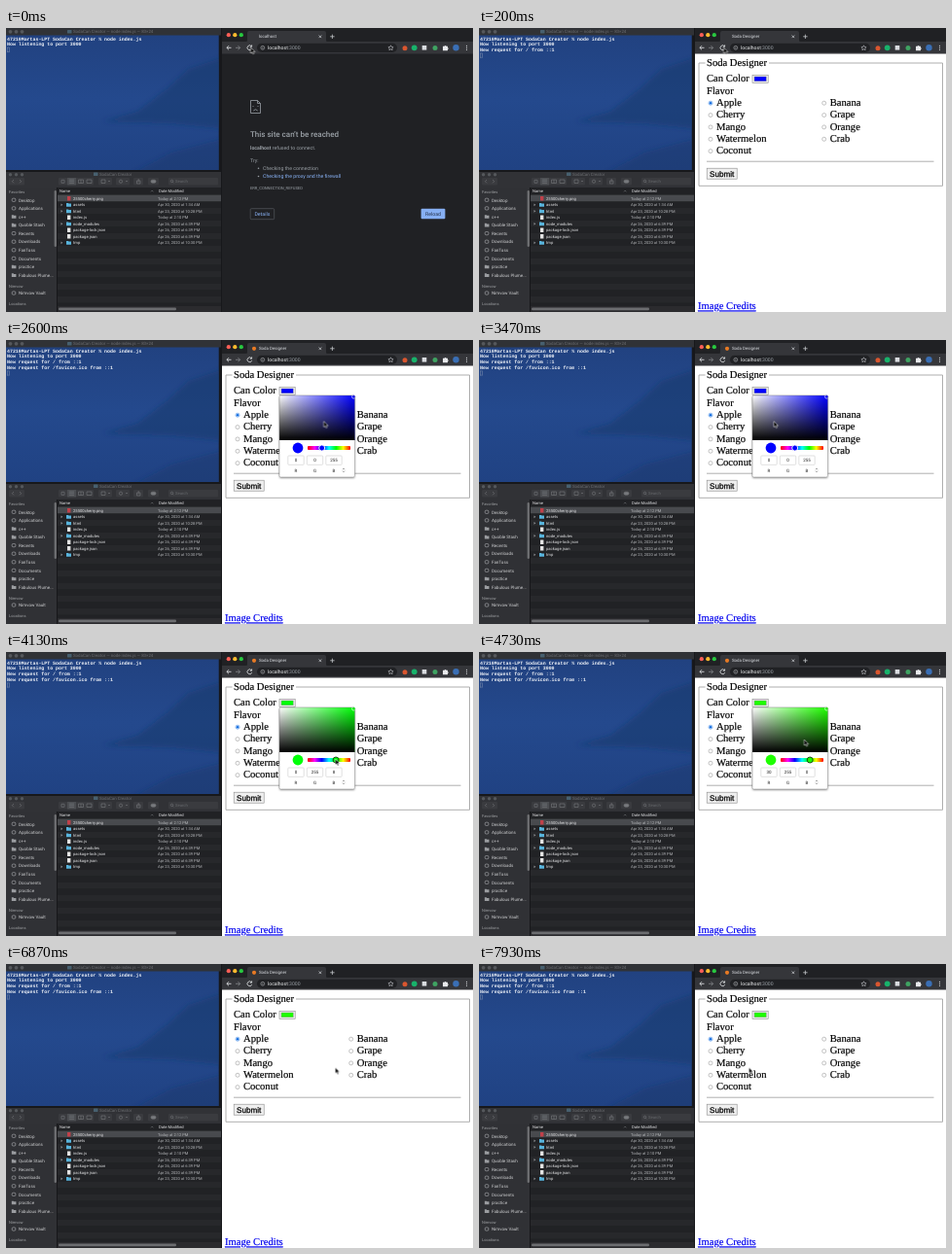
Recreate the animation shown at these times as an HTML page. Size 480 by 292 pixels, loop 8 s.

```html
<!DOCTYPE html>
<html lang="en">
<head>
<meta charset="utf-8">
<title>Soda Designer</title>
<style>
html, body { margin: 0; width: 100%; height: 100%; overflow: hidden; background: #000; }
svg { display: block; width: 100vw; height: 100vh; --hue: 240; }
text { font-family: Roboto, "Open Sans", sans-serif; text-rendering: geometricPrecision; white-space: pre; }
.mono text { font: bold 4.93px "Liberation Mono", monospace; fill: #f2f5fa; }
.serif text { font: 10.6px "Liberation Serif", serif; fill: #000; stroke: #000; stroke-width: .18; }
.serif .button { font: 8.1px "Liberation Sans", sans-serif; stroke-width: .25; }
.serif .credits { fill: #00e; stroke: #00e; text-decoration: underline; }
.hue { fill: hsl(var(--hue) 100% 50%); }
.side text { font-size: 4.5px; fill: #d0d1d3; }
.side .head { font-size: 4px; fill: #a0a2a5; }
.list text { font-size: 4.15px; fill: #e0e1e3; }
.list .date { font-size: 4.05px; fill: #b4b6b9; }
.err text { font-size: 5.2px; fill: #9aa0a6; }
.err .title { font-size: 8px; font-weight: 500; }
.err .code { font-size: 4.1px; }
.err .link { fill: #8ab4f8; }
.err .dark { fill: #26344f; }
.err .tab, .tab { font-size: 4.4px; fill: #dee1e6; }
.mid { text-anchor: middle; }

.err, .page, .req1, .req2, .icon, .picker { animation: 8s step-end infinite; }
.err { animation-name: err; }
.page { animation-name: page; }
.req1 { animation-name: req1; }
.req2 { animation-name: req2; }
.icon { animation-name: icon; }
.picker { animation-name: picker; }
.block { animation: block 8s step-end infinite; }
.cursor { animation: move 8s linear infinite; }

@keyframes err { 0% { visibility: visible } 2.5%, 100% { visibility: hidden } }
@keyframes page { 0% { visibility: hidden } 2.5%, 100% { visibility: visible } }
@keyframes req1 { 0% { visibility: hidden } 1.6%, 100% { visibility: visible } }
@keyframes req2 { 0% { visibility: hidden } 4.1%, 100% { visibility: visible } }
@keyframes icon { 0% { visibility: hidden } 13.3%, 100% { visibility: visible } }
@keyframes picker { 0% { visibility: hidden } 26.6% { visibility: visible } 67.5%, 100% { visibility: hidden } }
@keyframes block {
  0% { transform: none }
  1.6% { transform: translateY(5.8px) }
  4.1%, 100% { transform: translateY(11.6px) }
}
@keyframes move {
  0%, 2.5% { transform: translate(251.5px, 20px) }
  6% { transform: translate(246px, 50px) }
  10%, 13.3% { transform: translate(238.5px, 82px) }
  16.6% { transform: translate(285.5px, 54.5px) }
  22.5%, 29.2% { transform: translate(288px, 51px) }
  32.5% { transform: translate(326.5px, 83.5px) }
  36% { transform: translate(359px, 88px) }
  40% { transform: translate(354px, 67px) }
  43.2% { transform: translate(301px, 82px) }
  46.6%, 51.6% { transform: translate(338.5px, 110px) }
  55.9%, 57.5% { transform: translate(340px, 110px) }
  59.1% { transform: translate(333.5px, 90px) }
  62% { transform: translate(395px, 98px) }
  65%, 69.2% { transform: translate(426px, 36px) }
  72.5% { transform: translate(361.5px, 106px) }
  76% { transform: translate(347px, 121px) }
  80% { transform: translate(336px, 115px) }
  84% { transform: translate(330px, 123px) }
  88% { transform: translate(348px, 88px) }
  90.9% { transform: translate(354px, 100px) }
  94.5% { transform: translate(330px, 80px) }
  99.1%, 100% { transform: translate(277.5px, 106.5px) }
}
</style>
</head>
<body>
<svg viewBox="0 0 480 292" preserveAspectRatio="none">
  <defs>
    <linearGradient id="sea" x2="0" y2="1">
      <stop stop-color="#21417f"/><stop offset=".5" stop-color="#24498d"/><stop offset="1" stop-color="#204283"/>
    </linearGradient>
    <linearGradient id="white"><stop stop-color="#fff"/><stop offset="1" stop-color="#fff" stop-opacity="0"/></linearGradient>
    <linearGradient id="black" x2="0" y2="1"><stop stop-opacity="0"/><stop offset="1"/></linearGradient>
    <linearGradient id="hues">
      <stop stop-color="#f00"/><stop offset=".167" stop-color="#f0f"/><stop offset=".333" stop-color="#00f"/>
      <stop offset=".5" stop-color="#0ff"/><stop offset=".667" stop-color="#0f0"/>
      <stop offset=".833" stop-color="#ff0"/><stop offset="1" stop-color="#f00"/>
    </linearGradient>
    <filter id="soft"><feGaussianBlur stdDeviation="2.5"/></filter>
    <filter id="shade" x="-10%" y="-10%" width="120%" height="120%">
      <feDropShadow dx="0" dy="1" stdDeviation="1.2" flood-opacity=".4"/>
    </filter>
    <clipPath id="term"><rect width="218.7" height="146"/></clipPath>
  </defs>

  <!-- Terminal -->
  <rect width="222" height="292" fill="#17181b"/>
  <g clip-path="url(#term)">
    <rect width="219" height="146" fill="url(#sea)"/>
    <g filter="url(#soft)">
      <path d="M100 96 135 86 165 63 188 42 230 28V104L170 98Z" fill="#1b3768" opacity=".5"/>
      <path d="M120 155 170 128 230 112V155Z" fill="#1a3564" opacity=".35"/>
    </g>
  </g>
  <rect width="221" height="7.5" fill="#303236"/>
  <g fill="#55585c"><circle cx="4.5" cy="3.8" r="1.9"/><circle cx="10.5" cy="3.8" r="1.9"/><circle cx="16.5" cy="3.8" r="1.9"/></g>
  <rect x="63" y="2" width="4.5" height="3.5" rx=".5" fill="#47606f"/>
  <text x="69" y="5.3" font-size="4.4" fill="#6c6e72">SodaCan Creator — node index.js — 83×24</text>
  <g class="mono">
    <text x="1" y="12.5">47210Martas-LPT SodaCan Creator % node index.js</text>
    <text x="1" y="18.2">Now listening to port 3000</text>
    <text class="req1" x="1" y="24">New request for / from ::1</text>
    <text class="req2" x="1" y="29.7">New request for /favicon.ico from ::1</text>
    <rect class="block" x="1.3" y="20" width="2.4" height="4.8" fill="none" stroke="#7f90b0" stroke-width=".5"/>
  </g>

  <!-- File browser -->
  <rect y="148" width="221" height="144" fill="#212225"/>
  <rect y="148" width="221" height="16" fill="#313236"/>
  <g fill="#55585c"><circle cx="4.5" cy="150.8" r="1.7"/><circle cx="10.5" cy="150.8" r="1.7"/><circle cx="16.5" cy="150.8" r="1.7"/></g>
  <rect x="90" y="148.5" width="4.5" height="3.4" rx=".5" fill="#47606f"/>
  <text x="96" y="151.6" font-size="4.4" fill="#6c6e72">SodaCan Creator</text>
  <g fill="#3a3b3f">
    <rect x="3" y="154" width="16" height="7.5" rx="1"/><rect x="54" y="154" width="36" height="7.5" rx="1"/>
    <rect x="95" y="154" width="14" height="7.5" rx="1"/><rect x="113" y="154" width="14" height="7.5" rx="1"/>
    <rect x="131" y="154" width="10" height="7.5" rx="1"/><rect x="146" y="154" width="11" height="7.5" rx="1"/>
    <rect x="167" y="154" width="51" height="7.5" rx="1"/><rect x="63" y="154" width="9" height="7.5" fill="#4c4e52"/>
  </g>
  <g fill="none" stroke="#77797d" stroke-width=".6">
    <path d="M8 156l-1.7 1.7L8 159.4M14 156l1.7 1.7L14 159.4M57 156.3h3v3h-3zM65 156h5M65 157.7h5M65 159.4h5M74.5 156h5v3.5h-5zM77 156v3.5M83 156h5v3.5h-5zM98 156h4v3.5h-4zM134.5 157h3.5v3h-3.5zM136.2 158.5v-3.5M105 157l1 1 1-1M123 157l1 1 1-1"/>
    <circle cx="118" cy="157.7" r="1.6"/><circle cx="170.5" cy="157.4" r="1.2"/><path d="M171.4 158.3l1 1"/>
    <rect x="149" y="156.2" width="5" height="3" rx="1.5" fill="#77797d"/>
  </g>
  <text x="174" y="159.3" font-size="4.2" fill="#66686c">Search</text>
  <rect y="164" width="52" height="128" fill="#303135"/>
  <g class="side" id="side"></g>
  <rect x="49.6" y="167" width="2.4" height="58" rx="1.2" fill="#6c6d70"/>
  <rect x="52" y="164" width=".7" height="128" fill="#141416"/>
  <g class="list" id="list">
    <text x="55" y="169.2">Name</text><text x="157" y="169.2">Date Modified</text>
    <path d="M149 168.3l1.2-1.2 1.2 1.2" fill="none" stroke="#909296" stroke-width=".5"/>
    <rect x="53" y="171.3" width="168" height=".4" fill="#45474a"/>
  </g>
  <rect x="53" y="286" width="168" height="6" fill="#2b2b2e"/>
  <rect x="54" y="287.6" width="121" height="2.6" rx="1.3" fill="#6c6d70"/>

  <!-- Browser -->
  <rect x="222" width="258" height="292" fill="#202124"/>
  <path d="M246 14.5q2 0 2-2V5q0-2 2-2h77q2 0 2 2v7.5q0 2 2 2z" fill="#35363a"/>
  <rect x="222" y="14" width="258" height="12.5" fill="#35363a"/>
  <circle cx="228.8" cy="7.2" r="2.1" fill="#ff5f57"/><circle cx="235.3" cy="7.2" r="2.1" fill="#febc2e"/><circle cx="241.8" cy="7.2" r="2.1" fill="#28c840"/>
  <circle class="icon" cx="255" cy="8.8" r="2.1" fill="#e87a24"/>
  <g class="err"><text class="tab" x="260" y="10.4">localhost</text></g>
  <text class="page tab" x="260" y="10.4">Soda Designer</text>
  <g fill="none" stroke="#c4c7cb" stroke-width=".8">
    <path d="M321.6 7.5l2.6 2.6M324.2 7.5l-2.6 2.6M333.2 8.8h4.4M335.4 6.6v4.4"/>
    <path d="M231.5 20.3H227M229 18.2l-2.1 2.1 2.1 2.1" stroke="#e8eaed"/>
    <path d="M236 20.3h4.500M238.500 18.2l2.1 2.1-2.1 2.1" stroke="#85888c"/>
    <path d="M252.3 18.8a2.4 2.4 0 1 0 .4 2.3M252.6 17.4v1.8h-1.8" stroke="#e8eaed"/>
  </g>
  <rect x="258" y="15.7" width="144" height="9.2" rx="4.6" fill="#202124"/>
  <circle cx="263.8" cy="20.3" r="1.9" fill="none" stroke="#b4b7bb" stroke-width=".6"/>
  <path d="M263.8 20v1.3M263.8 19.1v.4" stroke="#b4b7bb" stroke-width=".6"/>
  <text x="269" y="22.1" font-size="5.1" fill="#9aa0a6"><tspan fill="#f1f3f4">localhost</tspan>:3000</text>
  <path d="M395.5 17.8l.8 1.7 1.8.2-1.3 1.2.3 1.8-1.6-.9-1.6.9.3-1.8-1.3-1.2 1.8-.2z" fill="none" stroke="#c4c7cb" stroke-width=".6"/>
  <circle cx="410" cy="20.8" r="2.5" fill="#d9562f"/><circle cx="419.7" cy="20.3" r="2.9" fill="#18b26b"/>
  <rect x="427.7" y="18" width="4.6" height="4.6" fill="#d9dce0"/><circle cx="441" cy="20.5" r="2.5" fill="#3fa362"/>
  <path d="M449 18.7h1.6a1 1 0 0 1 1.9 0H454v1.5a1 1 0 0 1 0 1.9v1.2h-5z" fill="#e8eaed"/>
  <circle cx="462.5" cy="20.3" r="3.2" fill="#3a6fb5"/>
  <g fill="#dadce0"><circle cx="473.5" cy="18.3" r=".6"/><circle cx="473.5" cy="20.3" r=".6"/><circle cx="473.5" cy="22.3" r=".6"/></g>

  <g class="err">
    <path d="M251.5 74.5h7l3 3v10h-10zM258.5 74.5v3h3M254 80v1M259 80v1M254.3 85q2.2-2.6 4.4 0" fill="none" stroke="#9aa0a6" stroke-width=".8"/>
    <text class="title" x="251" y="111.5">This site can’t be reached</text>
    <text x="251" y="125"><tspan font-weight="700">localhost</tspan> refused to connect.</text>
    <text x="251" y="138">Try:</text>
    <circle cx="259.5" cy="144.3" r=".8" fill="#9aa0a6"/><circle cx="259.5" cy="152.5" r=".8" fill="#9aa0a6"/>
    <text x="264" y="146">Checking the connection</text>
    <text class="link" x="264" y="154.2">Checking the proxy and the firewall</text>
    <text class="code" x="251" y="166.3">ERR_CONNECTION_REFUSED</text>
    <rect x="251.2" y="185.7" width="24.5" height="11" rx="1" fill="none" stroke="#5f6368" stroke-width=".6"/>
    <text class="link mid" x="263.4" y="193">Details</text>
    <rect x="426.6" y="185.7" width="24.8" height="10.6" rx="1" fill="#86aff3"/>
    <text class="dark mid" x="439" y="192.8">Reload</text>
  </g>

  <g class="page serif">
    <rect x="222" y="26.5" width="258" height="265.5" fill="#fff"/>
    <path d="M232.5 36H226v126.3h250.5V36H298" fill="none" stroke="#a5a5a5" stroke-width=".9"/>
    <text x="234" y="39">Soda Designer</text>
    <text x="234" y="55">Can Color</text>
    <rect x="281" y="48.3" width="16.2" height="8" fill="#efefef" stroke="#8c8c8c" stroke-width=".6"/>
    <rect class="hue" x="283" y="50" width="12.2" height="4.8" stroke="#888" stroke-width=".4"/>
    <text x="234" y="67.7">Flavor</text>
    <g id="flavors"></g>
    <path d="M234 137.2h233.5" stroke="#a5a5a5" stroke-width=".9"/>
    <rect x="234.2" y="144.2" width="31" height="11" fill="#efefef" stroke="#8c8c8c" stroke-width=".6"/>
    <text class="button mid" x="249.7" y="152.6">Submit</text>
    <text class="credits" x="225" y="289.4">Image Credits</text>
  </g>

  <g class="picker">
    <rect x="281" y="57" width="77.5" height="84" rx="1.5" fill="#fff" filter="url(#shade)"/>
    <rect class="hue" x="281" y="57" width="77.5" height="46"/>
    <rect x="281" y="57" width="77.5" height="46" fill="url(#white)"/>
    <rect x="281" y="57" width="77.5" height="46" fill="url(#black)"/>
    <circle class="hue" cx="357.3" cy="58.3" r="1.8" stroke="#fff" stroke-width=".6"/>
    <circle class="hue" cx="300" cy="111" r="5.4"/>
    <rect x="310" y="109" width="44" height="4" rx="1" fill="url(#hues)"/>
    <circle class="hue" id="thumb" cy="111" r="3" stroke="#fff" stroke-width=".9"/>
    <g id="rgb" font-size="4.5" fill="#222"></g>
    <path d="M346 133.2l1-1.3 1 1.3M346 134.6l1 1.3 1-1.3" fill="none" stroke="#555" stroke-width=".5"/>
    <rect x="281" y="57" width="77.5" height="84" rx="1.5" fill="none" stroke="#666" stroke-width=".4"/>
  </g>

  <path class="cursor" d="M0 0V6l1.4-1.2.9 2.1 1.1-.5-.9-2h1.9z" fill="#000" stroke="#fff" stroke-width=".5"/>
</svg>
<script>
const $ = id => document.getElementById(id);
const add = (id, markup) => $(id).insertAdjacentHTML("beforeend", markup);
const label = (x, y, s, cls = "") => `<text class="${cls}" x="${x}" y="${y}">${s}</text>`;

// Sidebar
const folders = ["c++", "Quoble Stash", "practice", "Fabulous Plume..."];
const places = ["Desktop", "Applications", "c++", "Quoble Stash", "Recents", "Downloads",
  "FanToss", "Documents", "practice", "Fabulous Plume..."];
const place = (y, s) => label(13, y, s) + (folders.includes(s)
  ? `<path d="M5.800 ${y - 3.4}h1.800l.5.600h2.300v3H5.800z" fill="#9b9da1"/>`
  : `<rect x="6.200" y="${y - 3.3}" width="3.600" height="3.200" rx="1" fill="none" stroke="#a2a4a8" stroke-width=".7"/>`);
add("side", label(3, 170.2, "Favorites", "head") +
  places.map((s, i) => place(178.5 + i * 8.58, s)).join("") +
  label(3, 266.8, "Nimvow", "head") + place(274.2, "Nimvow Vault") +
  label(3, 285.3, "Locations", "head"));

// File rows
const april = (day, time) => `Apr ${day}, 2020 at ${time}`;
const files = [
  ["25500cherry.png", "Today at 2:12 PM", "#c0414a"],
  ["assets", april(30, "1:34 AM")],
  ["html", april(23, "10:28 PM")],
  ["index.js", "Today at 2:10 PM", "#e4e4e4"],
  ["node_modules", april(26, "6:39 PM")],
  ["package-lock.json", april(26, "6:39 PM"), "#e4e4e4"],
  ["package.json", april(26, "6:39 PM"), "#e4e4e4"],
  ["tmp", april(23, "10:30 PM")]
];
for (let i = 0; i < 17; i++) {
  const y = 172 + i * 6.5;
  const fill = i ? (i % 2 ? "#212225" : "#27282b") : "#484a4e";
  add("list", `<rect x="53" y="${y}" width="168" height="6.5" fill="${fill}"/>`);
  if (!files[i]) continue;
  const [name, date, paper] = files[i];
  const icon = paper
    ? `<rect x="63" y="${y + 1}" width="3.4" height="4.5" fill="${paper}"/>`
    : `<path d="M56.5 ${y + 1.9}l1.8 1.4-1.8 1.4z" fill="#909296"/>
       <path d="M62 ${y + 1.4}h2l.6.6H67v3.2h-5z" fill="#58b4dc"/>`;
  add("list", icon + label(69, y + 4.7, name) + label(156, y + 4.7, date, "date"));
}

// Radio buttons
["Apple", "Cherry", "Mango", "Watermelon", "Coconut", "Banana", "Grape", "Orange", "Crab"].forEach((s, i) => {
  const x = i < 5 ? 238 : 354.7, y = 80 + (i % 5) * 12.35;
  const ring = (r, look) => `<circle cx="${x}" cy="${y - 2.8}" r="${r}" ${look}/>`;
  add("flavors", ring(2, `fill="#fff" stroke="${i ? "#9a9a9a" : "#3b86e6"}" stroke-width=".6"`) +
    (i ? "" : ring(1.2, 'fill="#0a6be0"')) + label(x + 6, y, s));
});

// Picker fields
["R", "G", "B"].forEach((s, i) => {
  const x = 298 + i * 19.5;
  add("rgb", `<rect x="${x - 8.2}" y="119" width="16.4" height="9.3" rx=".8" fill="#fff" stroke="#ccc" stroke-width=".6"/>` +
    label(x, 125.3, "0", "mid value") + label(x, 135.6, s, "mid"));
});
const values = document.querySelectorAll(".value");
const svg = document.querySelector("svg");

// Blue until the slider is clicked, then a short drag along the greens
function hueAt(t) {
  if (t < 3870) return 240;
  const drag = Math.min(1, Math.max(0, (t - 4130) / 340));
  return 121.88 - 8.94 * drag;
}

function draw(now) {
  const hue = hueAt(now % 8000);
  svg.style.setProperty("--hue", hue);
  $("thumb").setAttribute("cx", 310 + 44 * (1 - hue / 360));
  $("thumb").setAttribute("stroke", hue < 200 ? "#143d10" : "#fff");
  values.forEach((el, i) => {
    const k = (hue / 60 + [5, 3, 1][i]) % 6;
    el.textContent = Math.round(255 * (1 - Math.max(0, Math.min(k, 4 - k, 1))));
  });
  requestAnimationFrame(draw);
}
draw(performance.now());
</script>
</body>
</html>
```
